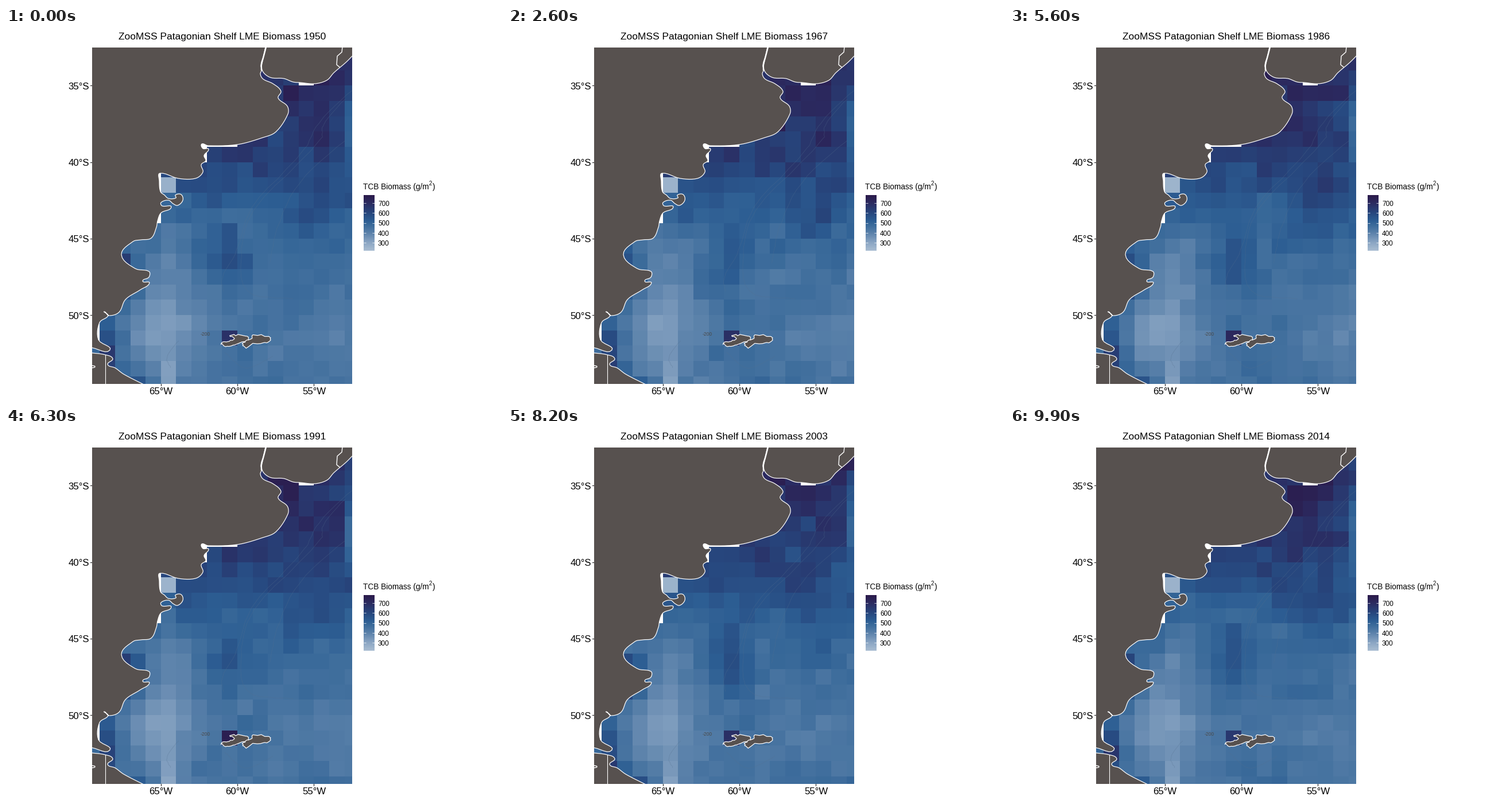
Animation of 864x648 px, one loop 10 s. Source, as a matplotlib script:

```python
import numpy as np
import matplotlib.pyplot as plt
from matplotlib.animation import FuncAnimation
from matplotlib.colors import LinearSegmentedColormap
from matplotlib.patches import Polygon, Rectangle

plt.rcParams["font.family"] = "Liberation Sans"

W, H = 864, 648
X0, Y0, DEG = 150, 33.8, 26.647       # panel corner and pixels per degree
COLS, ROWS = 18, 23                   # one-degree cells
FRAMES, YEARS, FIRST = 100, 65, 1950
HELD = {5, 16, 19, 27, 33, 61, 64}    # steps on which the picture rests
LOW, HIGH = 219, 781
LAND = "#57514f"

# Rich and poor waters: column, row, width, height, change
WATERS = [
    (4.5, 18.5, 2.4, 2.8, -125),      # southern shelf
    (5, 14, 1.5, 3, -60),             # inner shelf
    (5, 9, .5, .5, -310),             # northern gulf
    (5, 22, .6, 1.5, -110),
    (17.4, 5, 1, 2.6, -210),          # open ocean in the north-east
    (16, 19, 3, 2, -45),
    (9, 14, 1.2, 2.2, 85),            # shelf break
    (14.7, 10.5, 1.7, 2, 60),
    (9, 19, .4, .4, 230),             # west of the islands
    (2, 15, 1, 1.4, 220),             # coastal strip
    (1, 20.5, .8, 2.4, 180),
    (3, 22.5, .8, .6, 200),
]
EMPTY = [(14, 2), (7, 6), (7, 7), (8, 6), (9, 6), (4, 8), (4, 9), (4, 11),
         (11, 1), (0, 18), (0, 19)]

NORTH_COAST = [
    (452, 33), (448, 51), (444, 66), (446, 72), (443, 80), (448, 89), (465, 97),
    (479, 110), (474, 122), (490, 136), (491, 150), (470, 181), (447, 191),
    (403, 203), (352, 205), (341, 202), (343, 210), (353, 211), (345, 222),
    (348, 231), (340, 238), (343, 251), (330, 262), (300, 262), (268, 253),
    (267, 266), (269, 285),
]
SOUTH_COAST = [
    (276, 291), (283, 297), (296, 296), (295, 291), (305, 290), (308, 300),
    (299, 309), (291, 306), (283, 300), (270, 304), (272, 310), (288, 312),
    (270, 322), (264, 336), (262, 347), (253, 366), (235, 369), (221, 372),
    (201, 395), (225, 419), (249, 424), (249, 434), (238, 441), (250, 444),
    (234, 456), (208, 473), (197, 495), (179, 501), (171, 494), (178, 501),
    (163, 513), (161, 543), (181, 561), (150, 557),
]
EAST_BANK = [
    (453, 33), (448, 53), (446, 73), (460, 86), (484, 88), (500, 94), (512, 95),
    (538, 97), (559, 91), (571, 78), (592, 60), (604, 48),
]
FUEGO = [(150, 566), (172, 569), (186, 576), (177, 586), (190, 592), (205, 603),
         (240, 621)]
WEST_ISLE = [(374, 548), (379, 553), (391, 554), (409, 548), (423, 540),
             (405, 535), (391, 536), (398, 541), (389, 546)]
EAST_ISLE = [(412, 552), (418, 558), (430, 550), (447, 549), (461, 545),
             (458, 538), (431, 534), (428, 540), (417, 545)]
DEPTH_LINES = [
    [(603, 108), (545, 165), (520, 211), (428, 314), (403, 385), (376, 437), (379, 458)],
    [(590, 124), (552, 170), (549, 193), (432, 318), (411, 385), (420, 457), (500, 471)],
    [(590, 196), (511, 270), (472, 350), (460, 410)],
    [(300, 545), (280, 575), (287, 592)],
    [(380, 565), (418, 592), (465, 572)],
]


def curve(points, closed=False, steps=6):
    """Smooth path through the points; tangents scale with each segment."""
    p = np.array(points, float)
    if closed:
        p = np.vstack([p, p[:1]])
    before, after = np.roll(p, 1, 0), np.roll(p, -1, 0)
    before[0] = p[-2] if closed else p[0]
    after[-1] = p[1] if closed else p[-1]
    way = after - before
    way /= np.linalg.norm(way, axis=1, keepdims=True) + 1e-6
    size = np.linalg.norm(np.diff(p, axis=0), axis=1)[:, None, None]
    a, b, da, db = (v[:, None] for v in (p[:-1], p[1:], way[:-1], way[1:]))
    t = np.arange(steps)[None, :, None] / steps
    path = (a * (1 + 2 * t) * (1 - t) ** 2 + b * t ** 2 * (3 - 2 * t)
            + size * (da * t * (1 - t) ** 2 - db * t ** 2 * (1 - t)))
    return np.vstack([path.reshape(-1, 2), p[-1:]])


def rough(path, seed, amount):
    return path + np.random.RandomState(seed).normal(0, amount, path.shape)


def mean_field():
    rows, cols = np.mgrid[:ROWS, :COLS]
    field = 455 + 245 / (1 + np.exp((rows - 8.8) / 1.8))
    for c, r, w, h, change in WATERS:
        field += change * np.exp(-((cols - c) / w) ** 2 - ((rows - r) / h) ** 2)
    return field


def yearly_fields():
    rng = np.random.RandomState(11)
    base = mean_field()
    raw = rng.normal(size=(YEARS, ROWS, COLS))
    near = (np.roll(raw, 1, 1) + np.roll(raw, 1, 2)) / 2
    drift = .7 * raw + .5 * near + .3 * np.roll(raw, 1, 0)
    texture = rng.normal(size=base.shape)
    fields = base + (base / 550) ** 2 * (25 * drift + 8 * texture)
    fields = np.clip(fields, 232, 755)
    for c, r in EMPTY:
        fields[:, r, c] = np.nan
    return fields


def make_cmap():
    stops = [(LOW, "#a9bdd2"), (300, "#8ba6c4"), (400, "#5a81aa"), (480, "#3a6a9a"),
             (520, "#2d5e93"), (600, "#27477e"), (700, "#2b2b61"), (HIGH, "#2c1a4a")]
    cmap = LinearSegmentedColormap.from_list(
        "biomass", [((v - LOW) / (HIGH - LOW), colour) for v, colour in stops], N=512)
    cmap.set_bad("white")
    return cmap


fig = plt.figure(figsize=(W / 72, H / 72), dpi=72, facecolor="white")
ax = fig.add_axes([0, 0, 1, 1])
cmap = make_cmap()
fields = yearly_fields()
keys = np.round(np.arange(YEARS) * (FRAMES - 1) / (YEARS - 1))

panel = Rectangle((150, 34), 453, 586, transform=ax.transData)
tiles = ax.imshow(
    np.ma.masked_invalid(fields[0]), cmap=cmap, vmin=LOW, vmax=HIGH,
    interpolation="nearest", aspect="auto",
    extent=[X0 - DEG / 2, X0 + 17.5 * DEG, Y0 + 22.5 * DEG, Y0 - DEG / 2])
tiles.set_clip_path(panel)


def line(points, colour="white", width=1.1, **kw):
    xs, ys = np.array(points, float).T
    artist, = ax.plot(xs, ys, color=colour, lw=width, **kw)
    artist.set_clip_path(panel)


def land(path, *corners):
    outline = np.vstack([path, *corners])
    shape = Polygon(outline, fc=LAND, ec="white", lw=1.2, joinstyle="round", zorder=3)
    ax.add_patch(shape)
    shape.set_clip_path(panel)


def draw_map():
    for points in DEPTH_LINES:
        line(rough(curve(points), 3, .5), "#55708f", .7, alpha=.4, zorder=2)
    ax.text(347.5, 532, "-200", size=8.5, color="#4b4b4b", ha="center",
            va="center_baseline", zorder=2)
    land(curve(NORTH_COAST + SOUTH_COAST), (140, 557), (140, 20), (452, 20))
    land(curve(EAST_BANK), (615, 40), (615, 20), (453, 20))
    land(curve(FUEGO), (240, 630), (140, 630), (140, 566))
    for seed, isle in enumerate((WEST_ISLE, EAST_ISLE)):
        land(rough(curve(isle, closed=True, steps=4)[:-1], seed, .8))
    line(curve([(453, 33), (448, 52), (445, 62), (445, 73)]), width=2.4, zorder=4)
    line([(586, 33), (585, 42), (577, 49), (576, 64), (581, 68)], width=1.4, zorder=4)
    line([(173.3, 570), (173.3, 620)], zorder=4)
    line(curve([(150, 588), (155, 590), (150, 592)]), width=1.4, zorder=4)


def draw_axes():
    for lat in (35, 40, 45, 50):
        y = Y0 + (lat - 32.5) * DEG
        ax.plot([147, 150], [y, y], color="#333333", lw=1.2)
        ax.text(145, y + .5, f"{lat}°S", size=16.8, ha="right", va="center_baseline")
    for lon in (65, 60, 55):
        x = X0 + (69.5 - lon) * DEG
        ax.plot([x, x], [620, 623], color="#333333", lw=1.2)
        ax.text(x, 638, f"{lon}°W", size=16.8, ha="center", va="baseline")


def draw_legend():
    left, right = 622.9, 641.9
    ax.text(622, 281, "TCB Biomass (g/m", size=13.6, va="baseline")
    ax.text(737, 274.5, "2", size=9.8, va="baseline")
    ax.text(743, 281, ")", size=13.6, va="baseline")
    ax.imshow(np.linspace(HIGH, LOW, 300)[:, None], cmap=cmap, vmin=LOW, vmax=HIGH,
              extent=[left, right, 388, 291], aspect="auto")
    for value in range(300, 800, 100):
        y = 305 + (700 - value) * .1725
        for x in (left, right - 3.8):
            ax.plot([x, x + 3.8], [y, y], color="white", lw=.7, solid_capstyle="butt")
        ax.text(648, y + .5, str(value), size=11.8, va="center_baseline")


draw_map()
draw_axes()
draw_legend()
title = ax.text(376.5, 20, "", size=17.4, ha="center", va="baseline")
ax.set_xlim(0, W)
ax.set_ylim(H, 0)
ax.axis("off")


def update(frame):
    step = frame - 1 if frame in HELD else frame
    t = np.interp(step, keys, np.arange(YEARS))
    i = min(int(t), YEARS - 2)
    blend = fields[i] + (t - i) * (fields[i + 1] - fields[i])
    tiles.set_data(np.ma.masked_invalid(blend))
    year = FIRST + round(step * (YEARS - 1) / (FRAMES - 1))
    title.set_text(f"ZooMSS Patagonian Shelf LME Biomass {year}")
    return tiles, title


anim = FuncAnimation(fig, update, frames=FRAMES, interval=100, repeat=True,
                     repeat_delay=0, blit=False)
plt.show()
```
